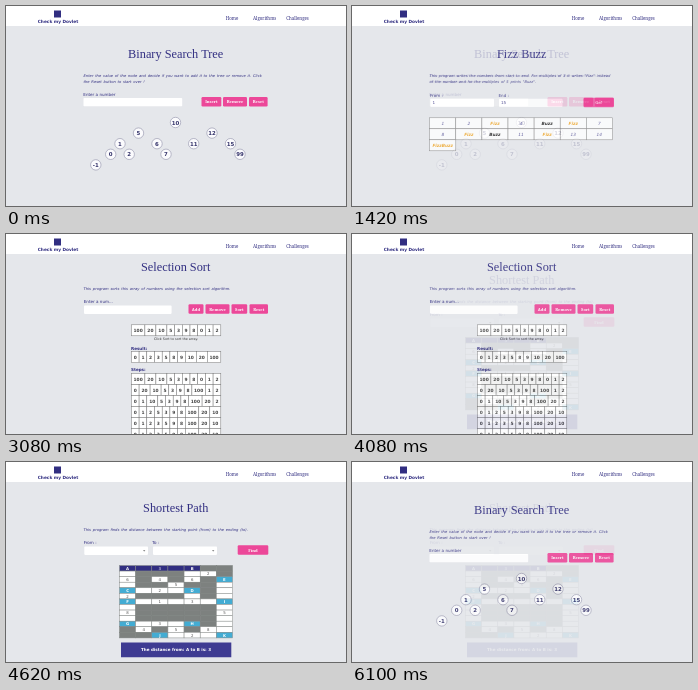
An HTML page with a canvas that plays this animation: 340 by 200 pixels, repeating every 6.16 s.

```html
<!DOCTYPE html>
<html lang="en">
<head>
<meta charset="utf-8">
<title>Algorithms</title>
<style>
html, body { margin: 0; width: 100%; height: 100%; overflow: hidden; background: #e5e7eb; }
canvas { display: block; }
</style>
</head>
<body>
<canvas id="stage" width="340" height="200"></canvas>
<script>
const W = 340, H = 200;
const SLIDE = 1540, HOLD = 1000, STEP = 60, FADE_STEPS = 10;
const NAVY = '#312e81', PINK = '#ec4899', GRAY = '#e5e7eb', AMBER = '#f0a31c';
const SANS = '"DejaVu Sans", sans-serif';
const SERIF = '"Noto Serif", serif';
const TITLE = '"Liberation Serif", serif';

let ctx;

function text(str, x, y, font, color = NAVY, align = 'left') {
  ctx.font = font;
  ctx.fillStyle = color;
  ctx.textAlign = align;
  ctx.fillText(str, x, y);
}

function box(x, y, w, h, fill, radius = 0) {
  ctx.fillStyle = fill;
  ctx.beginPath();
  ctx.roundRect(x, y, w, h, radius);
  ctx.fill();
}

function cell(x, y, w, h, fill, line = '#777') {
  box(x, y, w, h, fill);
  ctx.strokeStyle = line;
  ctx.lineWidth = 0.5;
  ctx.strokeRect(x, y, w, h);
}

const title = (str, y) => text(str, 169.7, y, `12.3px ${TITLE}`, NAVY, 'center');
const label = (str, x, y) => text(str, x, y, `4.1px ${SANS}`);
const input = (x, y, w) => box(x, y, w, 8.3, '#fff', 0.8);

function note(str, y) {
  ctx.wordSpacing = '0.6px';
  text(str, 77.5, y, `italic 3.7px ${SANS}`);
  ctx.wordSpacing = '0px';
}

function button(str, x, y, w, h = 9.5) {
  box(x, y, w, h, PINK, 1.2);
  text(str, x + w / 2, y + h / 2 + 1.6, `bold 4.1px ${SERIF}`, '#fff', 'center');
}

function header() {
  box(0, 0, W, H, GRAY);
  box(0, 0, W, 20, '#fff');
  box(48, 4.5, 7, 7, NAVY);
  text('Check my Dovlet', 52, 16.6, `bold 4.3px ${SANS}`, NAVY, 'center');
  text('Home', 219.8, 13.7, `4.4px ${SERIF}`);
  text('Algorithms', 247, 13.7, `4.4px ${SERIF}`);
  text('Challenges', 280.3, 13.7, `4.4px ${SERIF}`);
}

function searchTree() {
  title('Binary Search Tree', 51.5);
  note('Enter the value of the node and decide if you want to add it to the tree or remove it. Click', 70.8);
  note('the Reset button to start over !', 76.8);
  label('Enter a number', 77.3, 90);
  input(77.5, 92, 98.7);
  button('Insert', 195.5, 91, 19.8);
  button('Remove', 217, 91, 24);
  button('Reset', 243, 91, 18.6);

  const nodes = [
    [10, 169.5, 0], [5, 132.5, 1], [12, 206, 1], [1, 114, 2], [6, 151, 2], [11, 187.7, 2],
    [15, 224.5, 2], [0, 104.7, 3], [2, 123.2, 3], [7, 160, 3], [99, 234, 3], [-1, 89.8, 4]
  ];
  for (const [value, x, depth] of nodes) {
    const y = 116.5 + depth * 10.6;
    ctx.beginPath();
    ctx.arc(x, y, 5.2, 0, Math.PI * 2);
    ctx.fillStyle = '#fbfbfd';
    ctx.fill();
    ctx.strokeStyle = '#8f8fa8';
    ctx.lineWidth = 0.6;
    ctx.stroke();
    text(value, x, y + 2, `bold 5.4px ${SANS}`, '#35346b', 'center');
  }
}

function fizzBuzz() {
  title('Fizz Buzz', 52);
  note('This program writes the numbers from start to end. For multiples of 3 it writes "Fizz" instead', 71.3);
  note('of the number and for the multiples of 5 prints "Buzz".', 77.3);
  label('From :', 78, 90.5);
  label('End :', 146.5, 90.5);
  input(78.3, 92.8, 63.7);
  input(147, 92.8, 63.5);
  label('1', 80.5, 98.4);
  label('15', 149, 98.4);
  button('Go!', 231.5, 91.7, 30.5);

  const w = 26.1, h = 11;
  for (let n = 1; n <= 15; n++) {
    const x = 77.7 + (n - 1) % 7 * w, y = 111.8 + Math.floor((n - 1) / 7) * h;
    const word = (n % 3 ? '' : 'Fizz') + (n % 5 ? '' : 'Buzz');
    const color = n % 3 === 0 ? AMBER : word ? '#111' : '#4d4b94';
    cell(x, y, w, h, '#fff');
    text(word || n, x + w / 2, y + 7.2, `${word ? 'bold ' : ''}italic 4.3px ${SANS}`, color, 'center');
  }
}

function numberRow(values, y) {
  const widths = [0, 7.7, 11, 13.5];
  let x = 125.4;
  for (const value of values) {
    const w = widths[String(value).length];
    cell(x, y, w, 11, '#fff');
    text(value, x + w / 2, y + 7.2, `bold 4.4px ${SANS}`, '#444', 'center');
    x += w;
  }
}

function selectionSort() {
  title('Selection Sort', 37);
  note('This program sorts this array of numbers using the selection sort algorithm.', 56.4);
  label('Enter a num...', 77.7, 69);
  input(78, 71.6, 87.6);
  button('Add', 182.5, 70.3, 15);
  button('Remove', 199.5, 70.3, 24);
  button('Sort', 225.5, 70.3, 15.7);
  button('Reset', 243.5, 70.3, 18.5);

  const values = [100, 20, 10, 5, 3, 9, 8, 0, 1, 2];
  numberRow(values, 90.8);
  text('Click Sort to sort the array.', 170, 105.7, `3.3px ${SANS}`, '#333', 'center');
  text('Result:', 125, 115.5, `bold 4.1px ${SANS}`);
  numberRow([...values].sort((a, b) => a - b), 117.7);
  text('Steps:', 125, 137, `bold 4.1px ${SANS}`);
  for (let i = 0; i < 6; i++) {
    numberRow(values, 139.5 + i * 11);
    const least = values.indexOf(Math.min(...values.slice(i)));
    [values[i], values[least]] = [values[least], values[i]];
  }
}

function dropdown(x, y, w) {
  input(x, y, w);
  ctx.fillStyle = '#666';
  ctx.beginPath();
  ctx.moveTo(x + w - 5, y + 3.6);
  ctx.lineTo(x + w - 2.6, y + 3.6);
  ctx.lineTo(x + w - 3.8, y + 5);
  ctx.fill();
}

function shortestPath() {
  title('Shortest Path', 50);
  note('This program finds the distance between the starting point (from) to the ending (to).', 69.4);
  label('From :', 77.7, 82.4);
  label('To :', 146.3, 82.4);
  dropdown(78.3, 84.6, 63.7);
  dropdown(147, 84.6, 64);
  button('Find', 231.7, 83.3, 30.6);

  // '#' is a wall, letters are nodes, digits are path lengths
  const map = [
    'A 3 B##', ' ### 2#', '6#4#6#E', ' ##5## ', 'C 2 D# ', '2### # ', 'F 1 3 I',
    ' ##### ', '8#####5', ' ##### ', 'G 3 H# ', '#4#5#8 ', '##J 2 K'
  ];
  const w = 113 / 7, h = 72.4 / 13;
  map.forEach((row, r) => [...row].forEach((mark, c) => {
    const x = 113.5 + c * w, y = 103.5 + r * h;
    const isNode = /[A-Z]/.test(mark), isRoute = r === 0 && mark !== '#';
    const fill = isRoute ? NAVY : mark === '#' ? '#7d817f' : isNode ? '#43acd3' : '#fff';
    cell(x, y, w, h, fill, mark === '#' ? fill : '#858987');
    if (mark !== '#') {
      const weight = isNode ? 'bold ' : '';
      const color = isNode || isRoute ? '#fff' : '#555';
      text(mark, x + w / 2, y + 4.2, `${weight}3.9px ${SANS}`, color, 'center');
    }
  }));

  box(115, 180.4, 110.3, 14.8, '#3e3b92');
  text('The distance from: A to B is: 3', 170, 189.2, `bold 4.1px ${SANS}`, '#fff', 'center');
}

const slides = [searchTree, fizzBuzz, selectionSort, shortestPath].map(draw => {
  const canvas = document.createElement('canvas');
  canvas.width = W;
  canvas.height = H;
  ctx = canvas.getContext('2d');
  header();
  draw();
  return canvas;
});

const stage = document.getElementById('stage').getContext('2d');

function render() {
  const time = performance.now() % (SLIDE * slides.length);
  const index = Math.floor(time / SLIDE);
  const fading = time % SLIDE - HOLD;
  stage.globalAlpha = 1;
  stage.drawImage(slides[index], 0, 0);
  if (fading >= 0) {
    stage.globalAlpha = (Math.floor(fading / STEP) + 1) / FADE_STEPS;
    stage.drawImage(slides[(index + 1) % slides.length], 0, 0);
  }
  requestAnimationFrame(render);
}
render();
</script>
</body>
</html>
```
